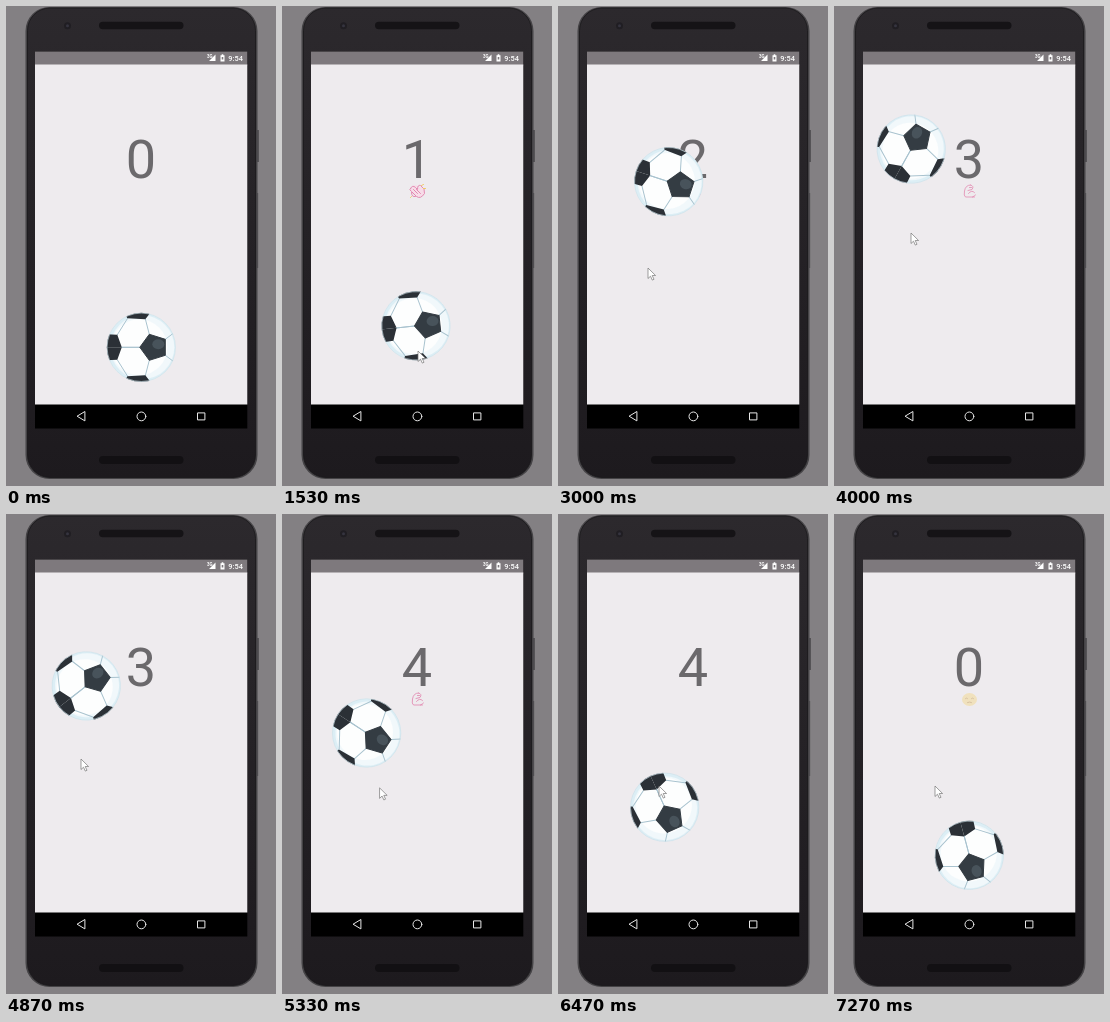
Animation of 270 by 480 pixels, one loop 7340 ms. Source, as an HTML page:

```html
<!DOCTYPE html>
<html lang="en">
<head>
<meta charset="utf-8">
<title>Keep the ball up</title>
<style>
html, body { margin: 0; width: 100%; height: 100%; overflow: hidden; background: #838083; }
svg { display: block; width: 270px; height: 480px; }
text { font-family: Roboto, Arial, sans-serif; }
.line { fill: none; stroke-linecap: round; stroke-linejoin: round; }
</style>
</head>
<body>
<svg viewBox="0 0 270 480">
  <defs>
    <clipPath id="field"><rect x="29" y="58.500" width="212.300" height="340"/></clipPath>
    <clipPath id="disc"><circle r="34.500"/></clipPath>
    <linearGradient id="shell" x2="0" y2="1">
      <stop offset="0" stop-color="#2c292d"/><stop offset="1" stop-color="#1d1a1e"/>
    </linearGradient>
    <!-- Upper half of the ball's pattern, mirrored below -->
    <g id="half">
      <path class="line" d="M-1.500 0H-20M8 -13L4 -28.500M24 -8L32 -14M-24 -12.500L-14 -28.500" stroke="#a9c3cf" stroke-width="1"/>
      <path d="M-19.500 0L-24 -12.500L-36 -13V0zM-18 -37L-14 -29L4 -28L11 -37z" fill="#2b3036"/>
    </g>
  </defs>

  <!-- Phone -->
  <path d="M250 124h3v32h-3z" fill="#555356"/>
  <path d="M250 187h2.200v75h-2.200z" fill="#59575a"/>
  <rect x="19.500" y="1" width="232" height="472" rx="24" fill="#454346"/>
  <rect x="21.500" y="2" width="228" height="469.500" rx="22.500" fill="url(#shell)" stroke="#19171a" stroke-width=".8"/>
  <circle cx="61.500" cy="19.800" r="3.500" fill="#201e23"/>
  <circle cx="61.500" cy="19.800" r="1.500" fill="#35343f"/>
  <rect x="93" y="15.800" width="84.500" height="7.500" rx="3.700" fill="#151316"/>
  <rect x="93" y="450" width="84.500" height="8" rx="4" fill="#121013"/>

  <!-- Screen -->
  <rect x="29" y="45.500" width="212.300" height="377" fill="#000"/>
  <rect x="29" y="45.500" width="212.300" height="14" fill="#7e797d"/>
  <rect x="29" y="58.500" width="212.300" height="340" fill="#eeebee"/>
  <g fill="#fff">
    <text x="201" y="51.500" font-size="4.500" font-weight="700">3G</text>
    <path d="M209.500 48.500v6.500h-6.500zM214.500 49.200h1.200v-1h1.600v1h1.200v6.300h-4z"/>
    <path d="M215.700 51h1.600v2.500h-1.600z" fill="#7e797d"/>
    <text x="222.300" y="54.500" font-size="7.400" font-weight="500">9:54</text>
  </g>
  <g class="line" stroke="#e8e8e8" stroke-width="1" transform="translate(.4 .4)">
    <path d="M78.500 405.500v9l-7.500-4.500zM191.500 406.500h7v7h-7z"/>
    <circle cx="135" cy="410" r="4.400"/>
  </g>

  <g clip-path="url(#field)">
    <text id="score" x="135" y="171.700" font-size="54" text-anchor="middle" fill="#6b696c">0</text>
    <g id="emoji" transform="translate(135.500 185.500)"></g>
    <g id="ball">
      <g clip-path="url(#disc)">
        <circle r="34.500" fill="#dceef5"/>
        <circle cx="1" r="32" fill="#f1f8fb"/>
        <circle cx="-2" r="28" fill="#fdfefe"/>
        <use href="#half"/>
        <use href="#half" transform="scale(1 -1)"/>
        <path d="M-1.500 0L8 -13L24 -8V8L8 13z" fill="#343c43" stroke="#343c43" stroke-linejoin="round"/>
        <ellipse cx="17" cy="-3" rx="6" ry="5" fill="#48535b"/>
      </g>
      <circle r="34.200" fill="none" stroke="#cfe2ea" stroke-width=".6"/>
    </g>
    <path id="cursor" d="M0 0v10.500l2.500-2.300 1.800 3.900 1.700-.8-1.800-3.800h3.400z" fill="#fff" stroke="#777" stroke-width=".7"/>
  </g>
</svg>
<script>
const $ = id => document.getElementById(id);
const LOOP = 7340, STEP = 200 / 3, HOLD = 800;
const G = 312, LOST = 6.7;
const START = [135.3, 341.3, 0], END = [135.3, 341.3, 75];

// start, apex time, apex y, start x, x speed, start angle, spin
const kicks = [
  [1.48, 2.14, 205, 134.3, -6, 0, -111],
  [2.637, 3.287, 150, 127.4, -46, -128, -589],
  [3.755, 4.38, 98, 76.4, 3.5, -67, 26],
  [5.147, 5.795, 152.5, 81, 19.5, -31, 346]
];

// time, x, y of the pointer tip
const pointer = [
  [.8, 157, 344], [1.07, 136, 345], [1.6, 136, 345], [2.2, 134, 298], [2.65, 133, 290],
  [3, 90, 262], [3.7, 77, 227], [4, 77, 227], [4.6, 75, 254], [4.87, 75, 245],
  [5.12, 77, 285], [5.4, 101, 272], [9, 101, 272]
];

const stroke = (color, d) => `<path class="line" d="${d}" stroke="${color}"/>`;
const pink = d => stroke("#e284ae", d), gold = d => stroke("#f0c95e", d);
const arm = pink("M1-6.500q-5 0-6 6-1 5 1 6h9M1-6.500q4 1 1.500 4.500l-4 1M-1 2q3-4 6-1M0-4h2M3 5.500q2-1 3-2");
const emojis = [
  `<path d="M-6-4q5-5 7 0 7-2 6 6-5 6-9 2-6-1-4-8z" fill="#f8dce8"/>` +
    pink("M-7-3q2-4 5-1l2 2q0-5 3-4 5 3 4 8-4 6-8 3l-5-5q-3-2-1-3zM-4-2l4 4M-1-2l4 4M-6 1q0 5 4 4") +
    gold("M4-6l2-1M6-3l2 0M-6 5l-1 1"),
  pink("M-6 0h3l3-6q3 0 1 5h5q2 4-1 7h-8l-3-1z"),
  arm,
  arm,
  `<ellipse rx="7.500" ry="6.500" fill="#f4d57e"/>` +
    stroke("#b98b3e", "M-4-1q1-1 2 0M2-1q1-1 2 0M-2 3q2-1 4 0")
];

function pointerAt(t) {
  const i = pointer.findIndex(p => p[0] > t), [t0, x0, y0] = pointer[i - 1], [t1, x1, y1] = pointer[i];
  const f = (t - t0) / (t1 - t0), e = f * f * (3 - 2 * f);
  return [x0 + (x1 - x0) * e, y0 + (y1 - y0) * e];
}

function ballAt(t, kick) {
  if (!kick) return START;
  if (t >= LOST) return END;
  const [t0, apex, top, x0, vx, a0, spin] = kick;
  return [x0 + vx * (t - t0), top + G * (t - apex) ** 2, a0 + spin * (t - t0)];
}

let shown = -1;
function showEmoji(i) {
  if (i !== shown) $("emoji").innerHTML = emojis[i] || "";
  shown = i;
}

function draw(ms) {
  const t = ms < HOLD ? 0 : (HOLD + Math.floor((ms - HOLD) / STEP + .06) * STEP) / 1000;
  const count = kicks.filter(k => k[0] <= t).length, kick = kicks[count - 1], lost = t >= LOST;
  const [x, y, angle] = ballAt(t, kick);
  $("ball").setAttribute("transform", `translate(${x} ${y}) rotate(${angle})`);
  $("score").textContent = lost ? 0 : count;
  showEmoji(lost ? 4 : count - 1);
  if (kick) $("emoji").setAttribute("opacity", Math.max(0, 1 - t + (lost ? LOST : kick[0])));
  $("cursor").style.display = t ? "" : "none";
  if (t) $("cursor").setAttribute("transform", `translate(${pointerAt(t)})`);
}

const start = performance.now();
(function frame() {
  draw((performance.now() - start) % LOOP);
  requestAnimationFrame(frame);
})();
</script>
</body>
</html>
```
